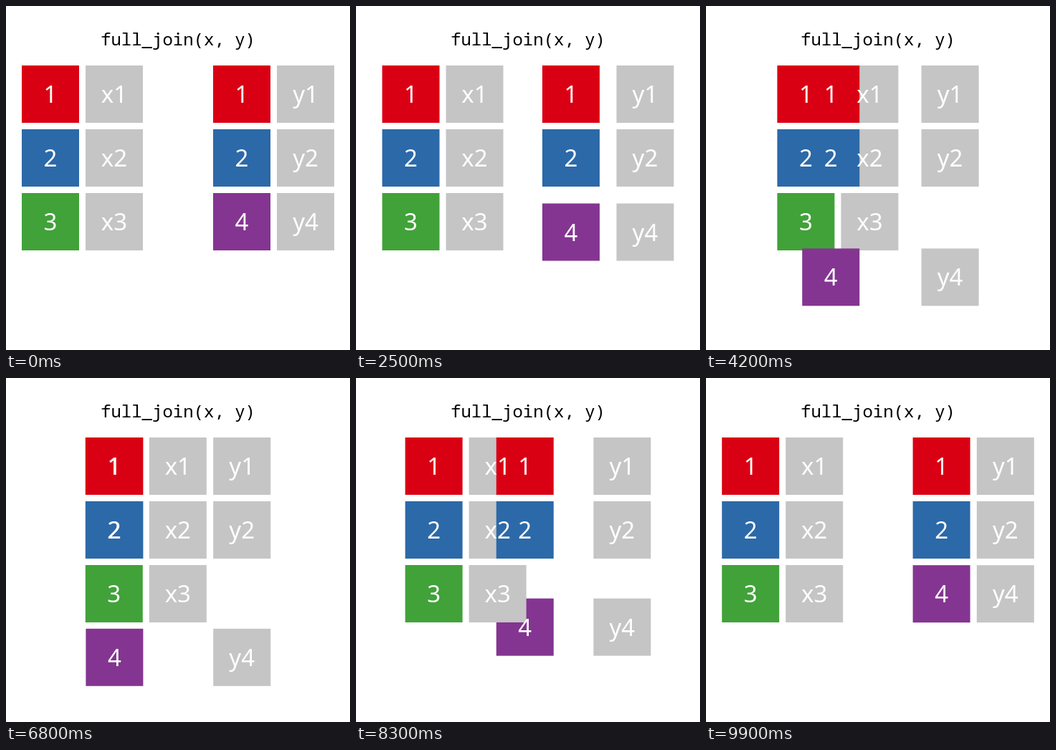
These frames come from a looping animation (480 px wide and 480 px high, 10000 ms). An HTML page:

```html
<!DOCTYPE html>
<html lang="en">
<head>
<meta charset="utf-8">
<title>full_join</title>
<style>
  html, body { margin: 0; height: 100%; overflow: hidden; background: #fff; }
  svg { display: block; width: 100vw; height: 100vh; }
  text { text-anchor: middle; }
  #title { font: 24px "Noto Sans Mono", "DejaVu Sans Mono", monospace; white-space: pre; }
  #labels { font: 33px "Noto Sans", "Open Sans", sans-serif; fill: #fff; }
</style>
</head>
<body>
<svg viewBox="0 0 480 480">
  <text id="title" x="240" y="55">full_join(x, y)</text>
  <g id="tiles"></g>
  <g id="labels"></g>
</svg>
<script>
const STEP = 89, SIZE = 80, LEFT = 22, TOP = 83, LOOP = 10000;
const colors = { 1: '#da0014', 2: '#2c69a8', 3: '#41a239', 4: '#843591' };
const tiles = document.getElementById('tiles');
const labels = document.getElementById('labels');

function add(parent, tag, attrs) {
  const el = document.createElementNS('http://www.w3.org/2000/svg', tag);
  for (const name in attrs) el.setAttribute(name, attrs[name]);
  return parent.appendChild(el);
}

// Columns and rows are grid cells: [label, column, row, final column, final row]
const cells = [
  ...[1, 2, 3].map(n => [n, 0, n - 1, 1, n - 1]),
  ...[1, 2, 3].map(n => ['x' + n, 1, n - 1, 2, n - 1]),
  ...[1, 2, 4].map((n, row) => [n, 3, row, 1, n - 1]),
  ...[1, 2, 4].map((n, row) => ['y' + n, 4, row, 3, n - 1])
].map(([label, ...path]) => {
  const rect = add(tiles, 'rect', { width: SIZE, height: SIZE, fill: colors[label] || '#c5c5c5' });
  const text = add(labels, 'text', { x: SIZE / 2, y: 52 });
  text.textContent = label;
  return { rect, text, path };
});
const firstX = cells[3].rect, firstY = cells[9].rect, key4 = cells[8].rect;

function ease(t, start, end) {
  const p = Math.min(1, Math.max(0, (t - start) / (end - start)));
  return (1 - Math.cos(Math.PI * p)) / 2;
}

function draw(t) {
  const k = ease(t, 1600, 5000) - ease(t, 6700, LOOP);
  for (const { rect, text, path: [col, row, endCol, endRow] } of cells) {
    const x = LEFT + STEP * (col + (endCol - col) * k);
    const y = TOP + STEP * (row + (endRow - row) * k);
    const move = `translate(${x} ${y})`;
    rect.setAttribute('transform', move);
    text.setAttribute('transform', move);
  }
  // On the way back, key 4 passes beneath the x column
  const next = t >= 5000 ? firstX : firstY;
  if (key4.nextSibling !== next) tiles.insertBefore(key4, next);
}

const begin = performance.now();
function tick(now) {
  const t = Math.max(0, now - begin) % LOOP;
  draw(Math.floor(t / 100) * 100);
  requestAnimationFrame(tick);
}
draw(0);
requestAnimationFrame(tick);
</script>
</body>
</html>
```
